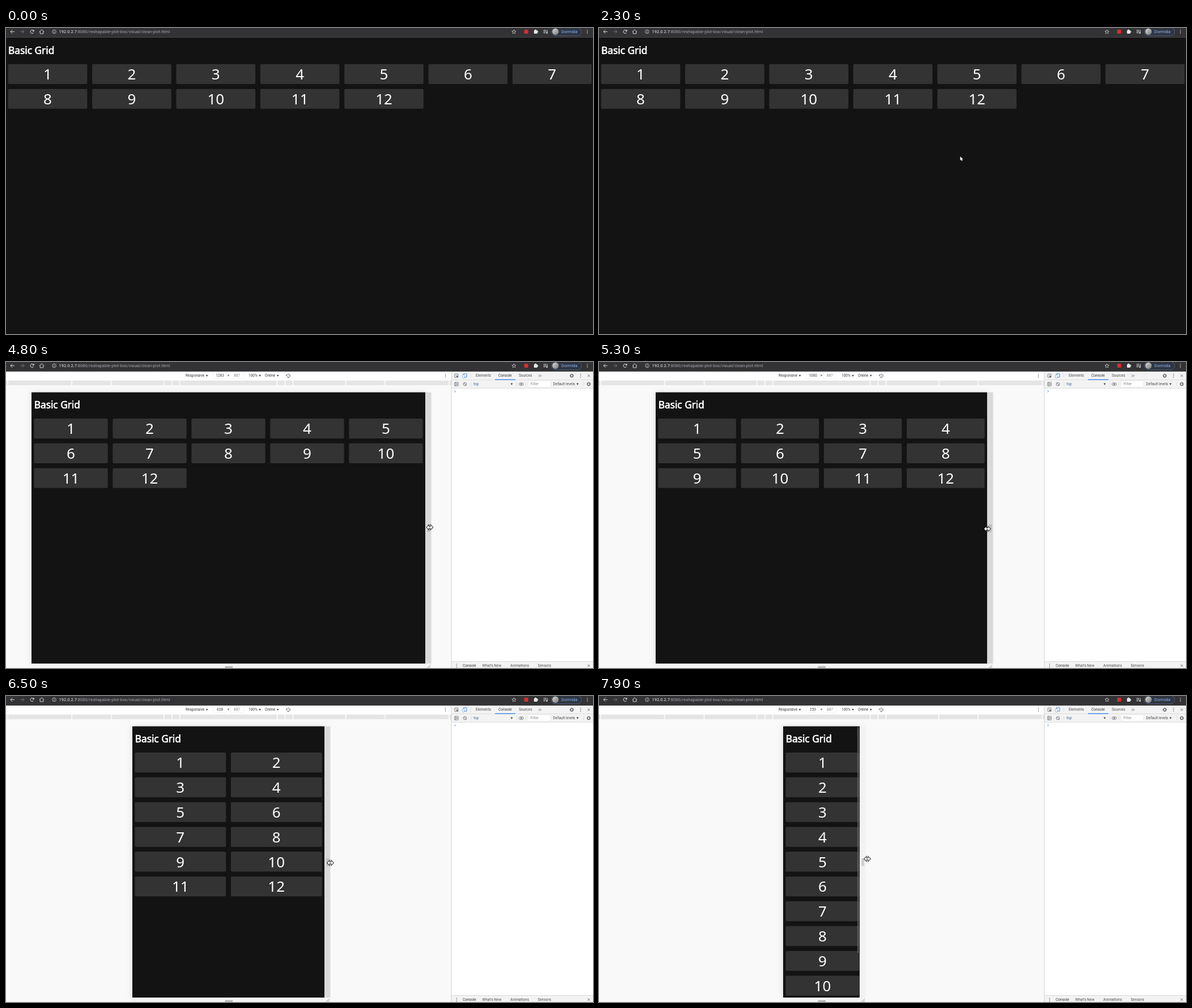
Animation of 1036x541 px, one loop 8000 ms. Source, as an HTML page with a canvas:

```html
<!DOCTYPE html>
<html lang="en">
<head>
<meta charset="utf-8">
<title>Basic Grid</title>
<style>
html, body { margin: 0; width: 100%; height: 100%; overflow: hidden; background: #131313; }
canvas { display: block; width: 1036px; height: 541px; }
</style>
</head>
<body>
<canvas id="stage"></canvas>
<script>
const W = 1036, H = 541, LOOP = 8000, STEP = 100;
const UI = 'Roboto, sans-serif', PAGE = '"Noto Sans", "Open Sans", sans-serif';
const GRAY = '#5f6368', LIGHT = '#e4e6e8', BLUE = '#1a73e8', BAR = '#f3f3f3', EDGE = '#cfcfcf';
const canvas = document.getElementById('stage');
const g = canvas.getContext('2d');
const dpr = window.devicePixelRatio || 1;
canvas.width = W * dpr;
canvas.height = H * dpr;

// ---- motion ----
const CENTER = 392.5, FIRST_WIDTH = 697, HANDLE = 10.5;
const drags = [
  { start: 4700, end: 5450, to: 549 },
  { start: 5600, end: 6490, to: 339 },
  { start: 6690, end: 7390, to: 135 }
];
// Free pointer moves over the cards: time, x, y
const wander = [
  [200, 60, 142], [700, 75, 92], [1100, 125, 88], [1450, 291, 90], [1600, 535, 103],
  [1840, 690, 132], [1920, 665, 192], [2300, 637.5, 227]
];

const lerp = (a, b, k) => a + (b - a) * k;
const part = (t, a, b) => Math.min(1, Math.max(0, (t - a) / (b - a)));
const smooth = k => k * k * (3 - 2 * k);

// The page width follows the pointer a little late
function viewWidth(t) {
  return drags.reduce((w, d) => lerp(w, d.to, part(t, d.start + 90, d.end + 10)), FIRST_WIDTH);
}
function pointer(t) {
  if (t < 3500) {
    const i = Math.max(1, wander.findIndex(p => p[0] >= t));
    const [a, b] = t > 2300 ? [wander.at(-1), wander.at(-1)] : [wander[i - 1], wander[i]];
    const k = part(t, a[0], b[0]);
    return [lerp(a[1], b[1], k), lerp(a[2], b[2], k)];
  }
  if (t < 4700) {
    const k = smooth(part(t, 3500, 4150));
    return [lerp(637.5, 751.5, k), lerp(227, 292, k)];
  }
  const w = drags.reduce((w, d) => lerp(w, d.to, smooth(part(t, d.start, d.end))), FIRST_WIDTH);
  const y = 292 + 3 * smooth(part(t, 4700, 5200)) - 7 * smooth(part(t, 6700, 7900));
  return [CENTER + w / 2 + HANDLE + 3 * part(t, 7700, 7850), y];
}

// ---- drawing helpers ----
function paint(fill, stroke, lw) {
  if (stroke) { g.strokeStyle = stroke; g.lineWidth = lw; g.stroke(); }
  if (fill) { g.fillStyle = fill; g.fill(); }
}
function rect(x, y, w, h, color) {
  g.fillStyle = color;
  g.fillRect(x, y, w, h);
}
function round(x, y, w, h, r, fill, stroke, lw = 0.8) {
  g.beginPath();
  g.roundRect(x, y, w, h, r);
  paint(fill, stroke, lw);
}
function circle(x, y, r, fill, stroke, lw = 0.8) {
  g.beginPath();
  g.arc(x, y, r, 0, Math.PI * 2);
  paint(fill, stroke, lw);
}
function poly(x, y, pts, fill, stroke, lw = 0.9) {
  g.beginPath();
  for (let i = 0; i < pts.length; i += 2) g.lineTo(x + pts[i], y + pts[i + 1]);
  if (fill) g.closePath();
  paint(fill, stroke, lw);
}
function text(str, x, y, color = '#4a4d51', size = 6.5, family = UI, align = 'left') {
  g.font = `${size}px ${family}`;
  g.textAlign = align;
  g.fillStyle = color;
  g.fillText(str, x, y);
}
function chevron(x, y, r, color) {
  poly(x, y, [-r, -Math.abs(r), 0, 0, -r, Math.abs(r)], null, color);
}
function navArrow(x, y, dir, color) {
  chevron(x + 3.5 * dir, y, 3.4 * dir, color);
  rect(x - 3.4, y - 0.45, 6.8, 0.9, color);
}
function dots(x, y, color) {
  for (const d of [-2.6, 0, 2.6]) circle(x, y + d, 0.75, color);
}
function caret(x, y) {
  poly(x, y, [-2, -1.5, 2, -1.5, 0, 1.8], '#4a4d51');
}
function gear(x, y) {
  circle(x, y, 2.2, null, GRAY, 1.3);
  g.setLineDash([1.1, 1.1]);
  circle(x, y, 3.2, null, GRAY, 1);
  g.setLineDash([]);
}
function cross(x, y) {
  for (const s of [1, -1]) poly(x, y, [-2, -2 * s, 2, 2 * s], null, GRAY);
}

// ---- browser bar ----
function browserBar() {
  const y = 6.5;
  rect(0, 0, W, 17, '#333335');
  rect(0, 16.2, W, 0.8, '#4b4b4d');
  navArrow(11.5, y, -1, LIGHT);
  navArrow(28.5, y, 1, '#77797c');
  g.beginPath();
  g.arc(46, y, 3, 0.5, 5.5);
  paint(null, LIGHT, 1);
  poly(46, y, [3.6, -3.8, 3.6, -0.4, 0.3, -0.4], LIGHT);
  poly(63, y, [-4.2, 0.2, 0, -3.6, 4.2, 0.2], null, LIGHT);
  poly(63, y, [-2.8, -0.8, -2.8, 3.5, 2.8, 3.5, 2.8, -0.8], null, LIGHT);
  circle(85, y, 3.3, null, LIGHT, 0.7);
  rect(84.6, 6, 0.8, 2.5, LIGHT);
  rect(84.6, 4.5, 0.8, 0.8, LIGHT);
  const host = '192.0.2.7';
  text(host, 93.5, 9.2, '#e8eaed', 7.57);
  text(':8080/reshapable-plot-box/visual/clean-plot.html',
    93.5 + g.measureText(host).width, 9.2, '#a2a5a9', 7.57);

  const star = Array.from({ length: 11 }, (_, i) => {
    const a = i * Math.PI / 5 - Math.PI / 2, r = i % 2 ? 1.7 : 3.8;
    return [r * Math.cos(a), r * Math.sin(a)];
  }).flat();
  poly(896.5, 6.8, star, null, LIGHT, 0.7);
  round(914.5, 3, 7, 7, 1, '#d32f2f');
  round(931.8, 4, 6, 6, 0.7, LIGHT);
  circle(934.6, 3.8, 1.3, LIGHT);
  circle(938, 6.8, 1.3, LIGHT);
  for (let i = 0; i < 3; i++) rect(948.5, 3.6 + 2.2 * i, i < 2 ? 5.5 : 3.5, 0.9, LIGHT);
  rect(955, 3.6, 0.8, 5, LIGHT);
  circle(954.5, 8.7, 1.3, LIGHT);
  round(962.8, -0.4, 53, 14, 7, '#2f3541', '#7195cb');
  const grad = g.createLinearGradient(965, 1, 975, 12);
  grad.addColorStop(0, '#d9d8d4');
  grad.addColorStop(1, '#77797a');
  circle(969.8, y, 5.7, grad);
  text('Dormida', 980, 9.2, '#8ab4f8', 7.57);
  dots(1026, 6.7, LIGHT);
}

// ---- page: as many columns of at least MIN as fit ----
const MIN = 130, GAP = 8.66, PAD = 4.4, ROW = 35.17;
function layout(left, top, width) {
  const inner = width - PAD * 2;
  const cols = Math.max(1, Math.floor((inner + GAP) / (MIN + GAP)));
  const w = Math.max(MIN, (inner - GAP * (cols - 1)) / cols);
  return Array.from({ length: 12 }, (_, i) => ({
    x: left + PAD + (i % cols) * (w + GAP),
    y: top + 46.4 + Math.floor(i / cols) * (ROW + GAP),
    w, cols, grow: 0
  }));
}
function gridPage(left, top, cards) {
  const x = left + PAD + 0.3, y = top + 28.7;
  text('Basic Grid', x, y, '#fff', 17.3, PAGE);
  g.strokeStyle = '#fff';
  g.lineWidth = 0.7;
  g.lineJoin = 'round';
  g.strokeText('Basic Grid', x, y);
  g.lineJoin = 'miter';
  cards.forEach((c, i) => {
    g.save();
    g.translate(c.x + c.w / 2, c.y + ROW / 2);
    g.scale(1 + c.grow, 1 + c.grow);
    round(-c.w / 2, -ROW / 2, c.w, ROW, 2.2, '#333');
    text(i + 1, 0, 9.7, '#fff', 26, PAGE, 'center');
    g.restore();
  });
}

// Hovered cards grow by 8% over 300 ms and shrink back at the same pace
function applyHover(cards, t) {
  const dt = 5, pace = 0.08 * dt / 300;
  for (let u = 200; u < t; u += dt) {
    const [x, y] = pointer(u);
    for (const c of cards) {
      const over = x >= c.x && x <= c.x + c.w && y >= c.y && y <= c.y + ROW;
      c.grow = Math.min(0.08, Math.max(0, c.grow + (over ? pace : -pace)));
    }
  }
}

// ---- device view ----
function deviceBar(width, ready) {
  const base = 26.3, mid = 24.3;
  rect(0, 17, 786, 524, '#f9f9f9');
  rect(0, 17, 786, 15, '#fff');
  text('Responsive', 317, base, '#333');
  text('100%', 428, base, '#333');
  text('Online', 457, base, '#333');
  for (const x of [354.5, 448, 479.8]) caret(x, mid);
  for (const x of [366, 396]) round(x, 18.8, 23, 10.6, 1, '#fff', '#e4e4e4');
  text(Math.round((width + 2.7) / 0.5437), 377.5, base, '#444', 6.5, UI, 'center');
  text('×', CENTER, base, '#333', 6.5, UI, 'center');
  text('887', 407.5, base, '#888', 6.5, UI, 'center');
  if (ready) {
    g.save();
    g.translate(498, mid);
    g.rotate(-Math.PI / 4);
    round(-1.5, -2.6, 3, 5.2, 0.5, null, GRAY);
    g.setLineDash([4, 2.5]);
    circle(0, 0, 3.6, null, GRAY, 0.7);
    g.restore();
    dots(775.5, mid, GRAY);
  }
  rect(0, 33, 786, 8, '#e5e5e5');
  for (const d of [86, 100, 114, 207, 276.5, 389.5])
    for (const s of [-1, 1]) rect(CENTER - 0.6 + s * d, 32, 1.4, 9.4, '#fff');
}

function viewport(width, held, ready) {
  const left = Math.round(CENTER - width / 2), right = Math.round(CENTER + width / 2);
  const top = 53.6, h = 479.8, w = right - left;
  g.save();
  g.shadowColor = 'rgba(0,0,0,0.13)';
  g.shadowBlur = 9 * dpr;
  rect(left, top, w, h, '#131313');
  g.restore();
  rect(right, top, HANDLE, h, held ? '#d9d9d9' : '#f2f2f2');
  rect(left, top + h, w + HANDLE, 8, '#f4f4f4');
  if (ready) {
    for (const i of [0, 1]) {
      rect(right + 4.2 + 2.4 * i, 287, 0.8, 13.5, '#8b8b8b');
      rect(386.5, 538 + 2.2 * i, 13.5, 0.8, '#777');
      poly(right, 541, [2.5 + 3.5 * i, 0.5, 8.7, 3.2 * i - 5.2], null, '#888', 0.8);
    }
  }
  const cards = layout(left, top, w);
  g.save();
  g.beginPath();
  g.rect(left, top, w, h);
  g.clip();
  gridPage(left, top, cards);
  if (cards[0].cols === 1) round(right - 3.6, top + 1.5, 1.9, 399, 1, '#6b6b6b');
  g.restore();
}

// ---- tool panel ----
function band(y, h) {
  rect(786, y, 250, h, BAR);
  rect(786, y + h - 0.4, 250, 0.7, EDGE);
}
function drawerTabs(y) {
  text('Console', 806, y, '#333');
  text("What's New", 840.5, y);
  text('Animations', 890, y);
  text('Sensors', 938.5, y);
}
function consoleRow() {
  const y = 39.1, base = 41.3;
  band(31.9, 14.4);
  round(791.8, 36, 6.4, 6.2, 0.4, null, GRAY);
  rect(793.2, 36, 0.7, 6.2, GRAY);
  poly(796, y, [-1, -1.6, 1.3, 0, -1, 1.6], GRAY);
  circle(810, y, 2.9, null, GRAY);
  poly(810, y, [-2, -2, 2, 2], null, GRAY);
  for (const x of [820, 901, 917, 1019.5]) rect(x, 35.3, 0.6, 7.5, EDGE);
  text('top', 825, base, '#46699c');
  caret(892.5, y);
  g.beginPath();
  g.ellipse(909.3, y, 4, 2.5, 0, 0, Math.PI * 2);
  paint(null, GRAY, 0.8);
  circle(909.3, y, 1.3, GRAY);
  round(922, 33.8, 38.5, 10.5, 1, '#fff', '#dedede');
  text('Filter', 925.5, base, '#85888c');
  text('Default levels', 965.5, base);
  caret(1008.7, y);
  gear(1028.5, y);
  chevron(793.5, 52, 1.8, '#367cf1');
}
function devtools(ready) {
  const y = 24.3, base = 26.3;
  rect(786, 17, 250, 524, '#fff');
  band(17, 14.6);
  rect(863, 30.6, 36, 1.3, BLUE);
  text('Elements', 829, base);
  text('Console', 869, base, '#333');
  text('Sources', 905, base);
  rect(819.8, 20.5, 0.6, 7.5, EDGE);
  if (ready) {
    round(792, 21.3, 6, 6, 0.5, null, GRAY);
    poly(795, y, [-0.8, -0.8, 3.8, 0.9, 0.8, 3.8], GRAY, BAR);
    round(807.3, 20.8, 5.8, 6.2, 0.5, null, BLUE);
    round(805.8, 23, 3, 5, 0.5, BAR, BLUE);
    for (const x of [942, 944.7]) chevron(x, y, 2, GRAY);
    gear(998.5, y);
    dots(1014, y, GRAY);
    cross(1028.5, y);
    consoleRow();
    band(529.3, 12);
    rect(786, 529.3, 250, 0.7, EDGE);
    dots(795.3, 536.8, GRAY);
    drawerTabs(539);
    cross(1028.5, 536.8);
  } else {
    rect(988.5, 20.5, 0.6, 7.5, EDGE);
    band(77.5, 15);
    rect(786, 77.3, 250, 0.7, EDGE);
    rect(801, 91.2, 34, 1.3, BLUE);
    drawerTabs(87.2);
  }
  rect(785.6, 17, 0.8, 524, '#c9c9c9');
}

// ---- pointers ----
function arrowCursor(x, y) {
  poly(x, y, [0, 0, 0, 7.2, 1.7, 5.7, 2.9, 8.3, 4.1, 7.8, 2.9, 5.2, 5.2, 5.2], '#fff', '#111', 1);
}
function resizeCursor(x, y) {
  const top = [[-5.4, 0], [-1.8, -3.7], [-1.8, -1.1], [1.8, -1.1], [1.8, -3.7], [5.4, 0]];
  const bottom = top.slice(1, -1).reverse().map(([px, py]) => [px, -py]);
  poly(x, y, [...top, ...bottom].flat(), '#fff', '#111', 1.7);
}

function draw(t) {
  const [x, y] = pointer(t);
  g.setTransform(dpr, 0, 0, dpr, 0, 0);
  if (t < 3000) {
    rect(0, 0, W, H, '#131313');
    const cards = layout(-0.7, 17.4, 1038.7);
    applyHover(cards, t);
    gridPage(-0.7, 17.4, cards);
    browserBar();
    if (t >= 200) arrowCursor(x, y);
    return;
  }
  const width = viewWidth(t), ready = t >= 3100;
  deviceBar(width, ready);
  viewport(width, t >= 4000 && t < 7800, ready);
  devtools(ready);
  browserBar();
  if (t < 4000) circle(x, y, 5.7, 'rgba(60,60,60,0.3)', '#858585', 1);
  else resizeCursor(x, y);
}

function tick(now) {
  draw(Math.floor(now % LOOP / STEP) * STEP);
  requestAnimationFrame(tick);
}
requestAnimationFrame(tick);
</script>
</body>
</html>
```
